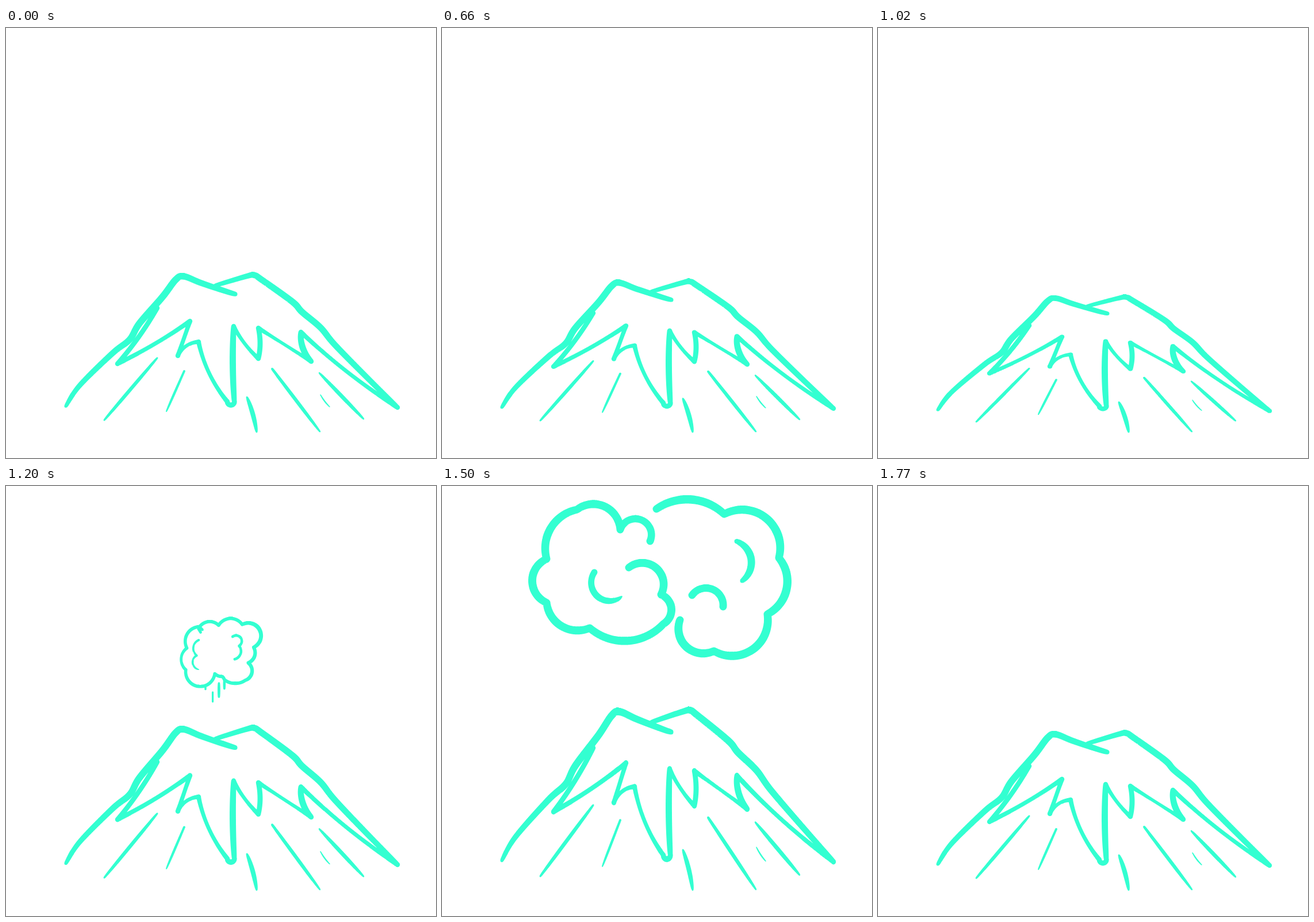
An HTML page with a canvas for the animation above (2.1 s loop, 748 by 748 pixels).

```html
<!DOCTYPE html>
<html lang="en">
<head>
<meta charset="utf-8">
<title>Volcano</title>
<style>
  html, body { margin: 0; width: 100%; height: 100%; overflow: hidden; background: #fff; }
  canvas { display: block; width: 748px; height: 748px; }
</style>
</head>
<body>
<canvas id="stage" width="748" height="748"></canvas>
<script>
const ctx = document.getElementById('stage').getContext('2d');
const INK = '#33ffd1';
const LOOP = 2100, STEP = 30, BASE = 704;

const lerp = (a, b, u) => a + (b - a) * u;

// Brush width: from w0 to w1 at the ends, swelling to mid between them
const swell = (w0, mid, w1) => u =>
  lerp(lerp(w0, w1, u), mid, Math.sqrt(Math.max(0, Math.sin(Math.PI * u))));

// Stamps a round brush along a curve at(u)
function brush(path, at, width, length) {
  const n = Math.ceil(length * 1.3);
  for (let k = 0; k <= n; k++) {
    const [x, y] = at(k / n), r = width(k / n) / 2;
    path.moveTo(x + r, y);
    path.arc(x, y, r, 0, Math.PI * 2);
  }
}

// Circular arc from p to q that bulges to the left of travel
function arcAt([x0, y0], [x1, y1], bulge) {
  const dx = x1 - x0, dy = y1 - y0, chord = Math.hypot(dx, dy);
  const half = 2 * Math.atan2(2 * bulge || 1e-4, chord);
  const r = chord / (2 * Math.sin(half));
  return u => {
    const a = half * (2 * u - 1);
    const s = (r * Math.sin(a) / chord) + 0.5;
    const h = r * (Math.cos(a) - Math.cos(half)) / chord;
    return [x0 + dx * s + dy * h, y0 + dy * s - dx * h];
  };
}

// Chain of arcs through knots [x, y, bulge, width of the next arc]
function arcs(path, knots, w, tip = w, tail = tip) {
  knots.slice(1).forEach((q, i) => {
    const p = knots[i], bulge = p[2] || 0;
    const length = Math.hypot(q[0] - p[0], q[1] - p[1]) + 2 * Math.abs(bulge);
    brush(path, arcAt(p, q, bulge), swell(tip, p[3] || w, tail), length);
  });
}

// Smooth curve through a few points
function ridge(path, pts, w, tip, tail) {
  const last = pts.length - 1;
  const at = u => {
    const i = Math.min(last - 1, Math.floor(u * last)), f = u * last - i;
    const p = k => pts[Math.max(0, Math.min(last, i + k))];
    return [0, 1].map(c => {
      const [a, b, d, e] = [p(-1)[c], p(0)[c], p(1)[c], p(2)[c]];
      return b + f / 2 * (d - a + f * (2 * a - 5 * b + 4 * d - e + f * (3 * (b - d) + e - a)));
    });
  };
  brush(path, at, swell(tip, w, tail), 900);
}

function makeMountain() {
  const m = new Path2D();
  ridge(m, [[104,658], [128,622], [185,566], [215,542], [232,514], [272,468],
            [295,438], [309,432], [338,443], [382,458], [399,463]], 12, 5, 7);
  ridge(m, [[364,448], [418,432], [432,430], [445,438], [498,476],
            [515,494], [547,521], [572,551], [628,608], [681,660]], 11.5, 6, 8);

  // Snow line
  arcs(m, [[681,660,5,6.5], [513,529,-6,11], [531,580,0,5.5], [439,522,3,9],
           [439,575,3,6], [396,519,-2,11], [397,648,7,9], [385,650,7,6.5],
           [335,546,-6,6], [299,570,0,7], [320,510,3,7], [194,584,-3,8.5], [263,487]], 8, 8.5);

  // Creases
  arcs(m, [[263,574], [171,682]], 6, 3);
  arcs(m, [[310,597], [279,667]], 4.5, 4, 2);
  arcs(m, [[419,642,2], [436,703]], 8, 2.5);
  arcs(m, [[463,593], [546,702]], 6, 4, 2.5);
  arcs(m, [[545,600], [622,680]], 6.5, 2.5);
  arcs(m, [[547,638,-1], [563,659]], 2.5, 1.5);
  return m;
}

function makePlume() {
  const p = new Path2D();
  arcs(p, [[303,73,17], [376,68,25], [467,65,51,15.5], [511,153,15,14], [490,213,21,14],
           [478,281,13], [398,278,-1], [390,266,3], [361,255,57], [249,240,20,11],
           [253,156,27], [303,73]], 12.5);
  arcs(p, [[298,82], [306,95]], 11);
  arcs(p, [[306,78], [313,85]], 10);

  // Inner curls
  arcs(p, [[291,185,17], [299,125]], 8.5, 9);
  arcs(p, [[300,239,20], [291,185]], 8.5, 2, 9);
  arcs(p, [[430,112,23], [455,148,15], [438,199]], 10.5);

  // Rising streaks
  arcs(p, [[353,327], [353,363]], 7.5);
  arcs(p, [[377,292], [377,345]], 11, 8);
  arcs(p, [[398,278], [398,313]], 10.5, 8);
  arcs(p, [[325,306], [325,315]], 8);
  return p;
}

function makeClouds() {
  const c = new Path2D();
  arcs(c, [[325,142,30], [381,189,16], [385,240,26], [257,247,22], [182,203,25],
           [182,127,22], [235,41,25], [310,76,29,12.5], [362,96]], 14, 13);
  arcs(c, [[373,40,21], [491,49,40], [586,125,24], [566,223,36], [473,287,27],
           [414,233]], 14.5, 13);
  arcs(c, [[313,192,28], [265,150]], 11.5, 1, 11);
  arcs(c, [[512,96,21], [522,165]], 13, 7);
  arcs(c, [[435,190,22], [489,210]], 13);
  return c;
}

const mountain = makeMountain(), plume = makePlume(), clouds = makeClouds();

// Mountain height over time: squash, hold, burst, settle
const heights = [[0, 1], [510, 1], [1020, 0.86], [1080, 0.86], [1350, 1.248], [1710, 1], [LOOP, 1]];

// Smoke poses: from, until, drawing, scale, pivot
const smoke = [
  [1200, 1260, plume, 0.45, 365, 385],
  [1260, 1320, plume, 0.75, 365, 375],
  [1320, 1440, plume, 1, 0, 0],
  [1440, 1620, clouds, 1, 0, 0],
  [1620, 1770, clouds, 0.84, 379, 158]
];

function heightAt(t) {
  const i = heights.findIndex(k => t < k[0]);
  const [t0, h0] = heights[i - 1], [t1, h1] = heights[i];
  return lerp(h0, h1, (t - t0) / (t1 - t0));
}

function fill(path, sx, sy, px, py) {
  ctx.setTransform(sx, 0, 0, sy, px * (1 - sx), py * (1 - sy));
  ctx.fill(path);
}

function draw(t) {
  ctx.setTransform(1, 0, 0, 1, 0, 0);
  ctx.fillStyle = '#fff';
  ctx.fillRect(0, 0, 748, 748);
  ctx.fillStyle = INK;
  fill(mountain, 1, heightAt(t), 0, BASE);
  for (const [from, until, path, s, px, py] of smoke) {
    if (t >= from && t < until) fill(path, s, s, px, py);
  }
}

const start = performance.now();
let shown = -1;
function tick() {
  const t = Math.floor(((performance.now() - start) % LOOP) / STEP) * STEP;
  if (t !== shown) draw(shown = t);
  requestAnimationFrame(tick);
}
tick();
</script>
</body>
</html>
```
